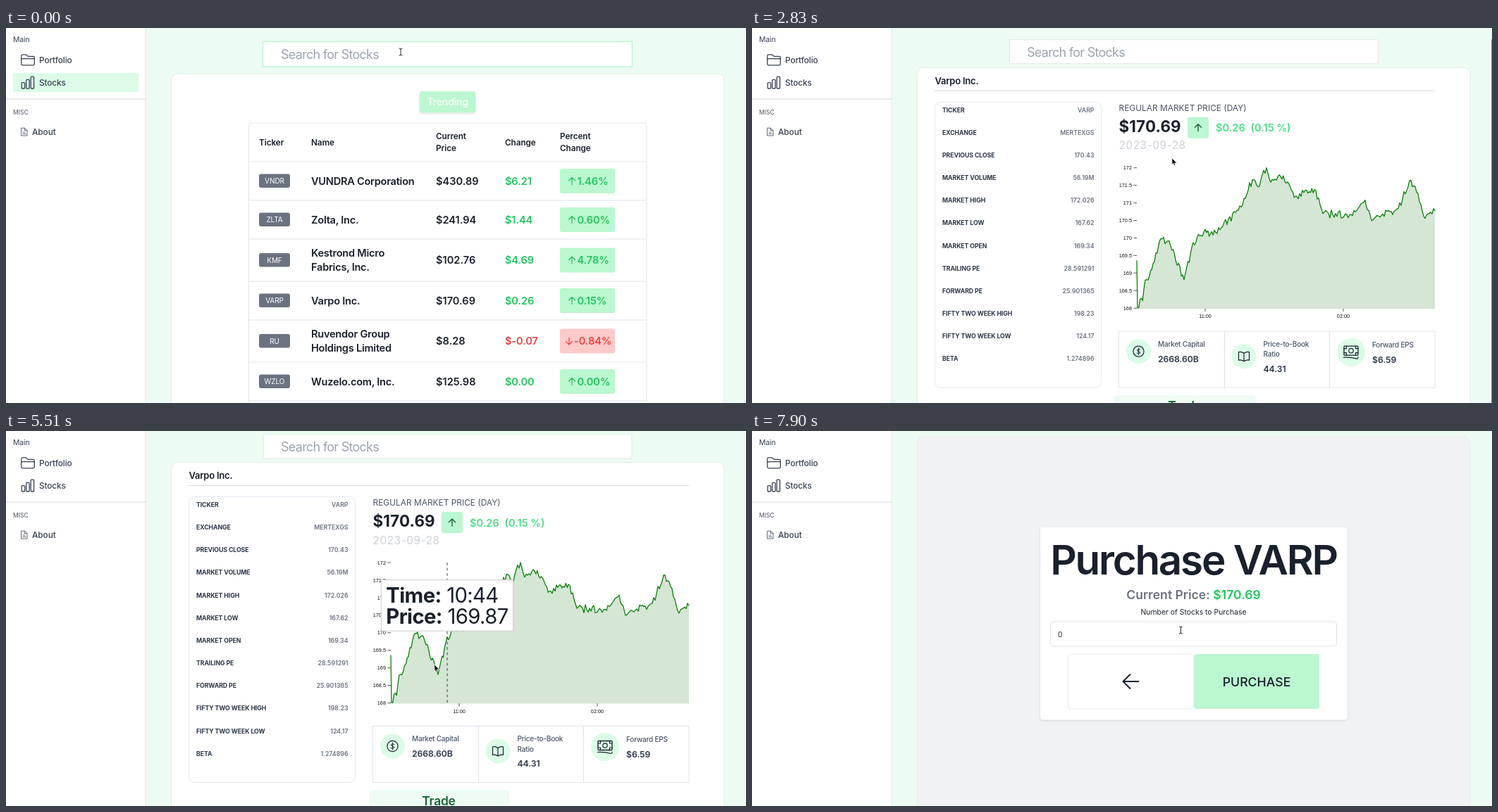
Animation of 1050 by 533 pixels, one loop 8 s. Source, as an HTML page:

```html
<!DOCTYPE html>
<html lang="en">
<head>
<meta charset="utf-8">
<title>Stock dashboard</title>
<style>
  html, body { margin: 0; width: 100%; height: 100%; overflow: hidden; background: #edfcf2; }
  svg { display: block; width: 100%; height: 100%; font-family: Inter, "Open Sans", sans-serif; }
  .axis { font-family: "Liberation Sans", Arial, sans-serif; }
</style>
</head>
<body>
<svg id="stage" viewBox="0 0 1050 533" xmlns="http://www.w3.org/2000/svg"></svg>
<script>
const LOOP = 8000, STEP = 148.8;
const INK = '#1a202c', SLATE = '#2d3748', GRAY = '#6b7280', LINE = '#e2e5ea';
const MINT = '#bbf7d0', PALE = '#dcfce7', GREEN = '#22c55e', PAGE = '#edfcf2';

// Markup helpers: text is placed by the middle of its capitals.
const text = (x, mid, str, size, weight = 400, fill = INK, anchor = 'start', track = -0.008) =>
  `<text x="${x}" y="${mid + size * 0.36}" font-size="${size}" font-weight="${weight}" fill="${fill}" text-anchor="${anchor}" letter-spacing="${track}em">${str}</text>`;
const rect = (x, y, w, h, fill, stroke = 'none', r = 0, extra = '') =>
  `<rect x="${x}" y="${y}" width="${w}" height="${h}" rx="${r}" fill="${fill}" stroke="${stroke}" ${extra}/>`;
const path = (d, stroke, width = 1, fill = 'none') =>
  `<path d="${d}" stroke="${stroke}" stroke-width="${width}" fill="${fill}" stroke-linecap="round" stroke-linejoin="round"/>`;
const rule = (x1, x2, y, color) => `<path d="M${x1} ${y}H${x2}" stroke="${color}"/>`;
const circle = (x, y, r, fill, stroke = 'none') =>
  `<circle cx="${x}" cy="${y}" r="${r}" fill="${fill}" stroke="${stroke}" stroke-width="1.2"/>`;
const group = (id, body, attrs = '') => `<g id="${id}" ${attrs}>${body}</g>`;
const arrow = (x, y, color, dir = 1, width = 1.2) =>
  path(`M${x} ${y + 5 * dir}v${-10 * dir}m-4.5 ${4.5 * dir}l4.5 ${-4.5 * dir}l4.5 ${4.5 * dir}`, color, width);
const searchHint = mid => text(390, mid, 'Search for Stocks', 18, 400, '#9ca3af', 'start', -0.04);

function sidebar() {
  const bar = i => rect(22.2 + i * 6.5, 77.6 - i * 4.2, 4.4, 8.4 + i * 4.2, 'none', '#374151', 1, 'stroke-width="1.3"');
  return rect(-1, -5, 199, 545, '#fff', '#dfe9e4') +
    group('active', rect(10, 64, 178, 27, PALE)) +
    text(10, 16, 'Main', 10.4, 400, '#374151') +
    path('M21.8 45.5v-6q0-1.7 1.7-1.7h4.5l3.5 2.5h7q1.8 0 1.8 1.7v9q0 1.8-1.8 1.8h-15q-1.7 0-1.7-1.8v-5.5q0-1.9 1.7-1.9h15q1.8 0 1.8 1.9', '#374151', 1.3) +
    text(47, 45.5, 'Portfolio', 11.8, 500, '#374151') +
    [0, 1, 2].map(bar).join('') +
    text(47, 77.5, 'Stocks', 11.8, 500, '#374151') +
    rule(0, 198, 101, '#d5d8dd') +
    text(10, 119.5, 'MISC', 8.6, 400, '#4b5563') +
    path('M22 142.2h4.5l3.5 3.5v7.3h-8zm4.5 0v3.5h3.5m-6 2.5h3m-3 2.2h4', '#4b5563', 0.9) +
    text(37, 147.5, 'About', 11.9, 500, '#374151');
}

function stockList() {
  const heads = [[359, 'Ticker'], [433, 'Name'], [610, 'Current Price'], [708, 'Change'], [786, 'Percent Change']];
  const rows = [
    ['VNDR', 'VUNDRA Corporation', '430.89', '6.21', '1.46'],
    ['ZLTA', 'Zolta, Inc.', '241.94', '1.44', '0.60'],
    ['KMF', 'Kestrond Micro|Fabrics, Inc.', '102.76', '4.69', '4.78'],
    ['VARP', 'Varpo Inc.', '170.69', '0.26', '0.15'],
    ['RU', 'Ruvendor Group|Holdings Limited', '8.28', '-0.07', '-0.84'],
    ['WZLO', 'Wuzelo.com, Inc.', '125.98', '0.00', '0.00']
  ];
  const lines = (x, mid, parts, gap, size, track) => parts.map((s, i) =>
    text(x, mid + (i - (parts.length - 1) / 2) * gap, s, size, 600, INK, 'start', track)).join('');
  let top = 190;
  const row = ([ticker, name, price, change, percent]) => {
    const parts = name.split('|'), height = 50 + 5 * parts.length, y = top + height / 2;
    const down = change[0] === '-', color = down ? '#ef4444' : GREEN;
    top += height;
    return rect(359, y - 10, 44, 19.5, GRAY, 'none', 3) +
      text(381, y, ticker, 10, 400, '#fff', 'middle') +
      lines(433, y, parts, 20, 14.6, -0.018) +
      text(610, y, '$' + price, 14.6, 600, INK, 'start', 0) + text(708, y, '$' + change, 14.6, 600, color) +
      rect(786, y - 17.5, 78, 35, down ? '#fecaca' : MINT, 'none', 3) +
      arrow(down ? 799 : 803, y, color, down ? -1 : 1) +
      text(down ? 806 : 810.5, y, percent + '%', 14.6, 600, color) +
      rule(344, 909, top, '#dfe2e7');
  };
  return rect(364.5, 19.5, 524, 35.5, '#fff', MINT, 0, 'stroke-width="1.5"') +
    searchHint(38).replace('<text', '<text id="query"') +
    group('caret', rect(0, 29, 1, 18, INK)) +
    rect(234.5, 65, 784.5, 500, '#fff', '#dcefe4', 9) +
    rect(587, 90, 79, 30.5, MINT, 'none', 4, 'filter="url(#soft)"') +
    text(626.5, 105, 'Trending', 14.6, 600, '#f4fef7', 'middle', -0.035) +
    rect(344.5, 135, 564.5, 450, '#fff', LINE, 4) + rule(344, 909, 190, LINE) +
    heads.map(([x, s]) => lines(x, 162.5, s.split(' '), 17, 11.8, -0.008)).join('') + rows.map(row).join('') +
    group('results', rect(365.5, 56, 523, 121.5, '#fff', LINE) +
      ['Varpo Inc.', 'Varpono Corp.', 'Varpolis Ltd.'].map((s, i) => text(390, 76.5 + i * 40.5, s, 11.8)).join(''));
}

const noise = i => { const v = Math.sin(i * 12.9898) * 43758.5453; return v - Math.floor(v) - 0.5; };
const mix = (a, b, u) => a + (b - a) * u;

// Piecewise linear lookup in rows sorted by their first value.
function sample(rows, at) {
  let i = 1;
  while (i < rows.length - 1 && rows[i][0] < at) i++;
  const a = rows[i - 1], b = rows[i];
  const u = Math.min(1, Math.max(0, (at - a[0]) / (b[0] - a[0])));
  return a.map((v, c) => mix(v, b[c], u));
}

// Price curve: the main swings, roughened by jitter that is strongest at the open.
const SWINGS = [[546, 319], [547, 386], [556, 360], [573, 308], [582, 288], [590, 291], [613, 346], [626, 293.2],
  [641, 279], [658, 279], [690, 247.4], [710, 204], [718, 214], [730, 187], [734, 203], [750, 199], [775, 231],
  [785, 219], [800, 219], [810, 252], [852, 255], [870, 233], [879, 262], [917, 245], [933, 205], [941, 214],
  [955, 259], [969, 248]];
const curve = [SWINGS[0]];
SWINGS.slice(1).forEach(([x, y], i) => {
  const [px, py] = SWINGS[i], count = Math.max(1, Math.round((x - px) / 2));
  for (let j = 1; j <= count; j++) {
    const at = mix(px, x, j / count), rough = 12 + 45 * Math.exp((546 - at) / 11);
    curve.push([at, mix(py, y, j / count) + (j < count ? noise(at) * rough : 0)]);
  }
});

function chart() {
  const line = 'M' + curve.map(([x, y]) => `${x.toFixed(1)} ${Math.min(386, y).toFixed(1)}`).join('L');
  let axis = '';
  for (let i = 0; i <= 8; i++) {
    const y = 187 + i * 24.94;
    axis += rule(541.5, 546, y, '#555') + text(539, y, 172 - i / 2, 7.3, 400, '#111', 'end', 0);
  }
  ['11:00', '02:00'].forEach((s, i) => {
    const x = 643 + i * 196;
    axis += path(`M${x} 387.5v3.5`, '#555') + text(x, 398, s, 7.3, 400, '#111', 'middle', 0);
  });
  return path(line + 'V387.5H546Z', 'none', 0, '#d5e6d4') + path(line, '#0a800a', 1.3) + group('axis', axis, 'class="axis"');
}

function detail() {
  const facts = { 'TICKER': 'VARP', 'EXCHANGE': 'MERTEXGS', 'PREVIOUS CLOSE': '170.43', 'MARKET VOLUME': '56.19M',
    'MARKET HIGH': '172.026', 'MARKET LOW': '167.62', 'MARKET OPEN': '169.34', 'TRAILING PE': '28.591291',
    'FORWARD PE': '25.901365', 'FIFTY TWO WEEK HIGH': '198.23', 'FIFTY TWO WEEK LOW': '124.17', 'BETA': '1.274896' };
  const factRows = Object.entries(facts).map(([name, value], i) => {
    const y = 104.7 + i * 32.18;
    return text(270, y, name, 8.75, 700, SLATE, 'start', -0.01) + text(485.5, y, value, 8.75, 600, GRAY, 'end', 0);
  }).join('');
  const stat = (x, mid, names, value) =>
    names.map((s, i) => text(x, mid + i * 14.5, s, 10.1, 500, '#4a5568', 'start', -0.025)).join('') +
    text(x, mid + 6.5 + names.length * 14.5, value, 12.3, 600, SLATE);
  const stats = rect(520.5, 419.5, 448.5, 80, '#fff', '#dfe4ee') +
    path('M670.5 419.5v80m149-80v80', '#dbe1f1') +
    circle(548.5, 448, 17.5, PALE) + circle(548.5, 448, 7.6, 'none', INK) +
    path('M548.5 443v10m2.5-7.3q-2.5-1.9-4.4-.1q-1 1.8 1.9 2.4q3.1.7 2.1 2.5q-2.1 1.7-4.6-.1', INK) +
    circle(698, 455, 17.5, PALE) +
    path('M698 450.5q-3.5-2.7-7.5-1.5v11.5q4-1 7.5 1.5q3.5-2.5 7.5-1.5v-11.5q-4-1.2-7.5 1.5v11.5', INK, 1.2) +
    circle(850, 449, 20, PALE) + rect(840, 440.5, 20, 13, 'none', INK, 1, 'stroke-width="1.3"') +
    path('M840 444h3.5v-3.5m13 0v3.5h3.5m-20 6h3.5v3.5m13 0v-3.5h3.5m-20.5 6.5q10.500-.5 19 2q1.500.2 1.500-2.500', INK, 1.2) +
    circle(850, 447, 3.2, 'none', INK) +
    stat(576, 437.5, ['Market Capital'], '2668.60B') +
    stat(725.5, 437.5, ['Price-to-Book', 'Ratio'], '44.31') +
    stat(880, 438.5, ['Forward EPS'], '$6.59');
  const loaded = rect(234.5, 44.5, 784.5, 600, '#fff', '#dcefe4', 9) +
    text(259.5, 63.5, 'Varpo Inc.', 13.1, 600, INK, 'start', -0.02) + rule(259, 969, 77.5, '#d3dae2') +
    rect(259.5, 93.5, 236, 406, '#fff', '#e2e8f0', 8) + factRows +
    text(520.5, 102, 'REGULAR MARKET PRICE (DAY)', 11.9, 400, '#4a5568', 'start', 0) +
    text(520.5, 128, '$170.69', 22.4, 700, INK, 'start', 0.006) +
    rect(618, 115, 30, 30, MINT, 'none', 3) + arrow(633, 130, '#166534', 1, 1.4) +
    text(658, 130.5, '$0.26', 14.6, 600, '#4ade80', 'start', 0) + text(707.5, 130.5, '(0.15 %)', 14.6, 600, '#4ade80', 'start', 0) +
    text(520.5, 155, '2023-09-28', 15.4, 400, '#cdd1d8', 'start', 0.035) + chart() + stats +
    `<rect id="trade" y="510.5" height="60" rx="4" fill="#eefcf3"/>` +
    text(614, 525.5, 'Trade', 17.5, 600, '#166534', 'middle', -0.015);
  return rect(365.3, 5, 522.7, 34, '#fff', '#dfeae4') + searchHint(22.5) +
    group('empty', rule(234, 1019, 44.5, '#d3e6de')) + group('loaded', loaded);
}

function tooltip() {
  const row = (y, name, id) => `<text id="${id}Row" x="7" y="${y}"><tspan font-weight="700">${name}:</tspan> <tspan id="${id}"></tspan></text>`;
  return `<path id="guide" d="M0 187V387.5" stroke="#444" stroke-dasharray="4 3.5"/>` +
    group('tip', `<rect id="tipBox" height="72.5" fill="#fff" stroke="#ccc"/>` + row(32.5, 'Time', 'clock') + row(62.5, 'Price', 'price'),
      `font-size="29.3" letter-spacing="-.022em" fill="${INK}"`);
}

function purchase() {
  return rect(234.5, 8, 784.5, 560, '#f1f2f4', '#e4efe9', 9) +
    rect(409, 137, 436, 273.5, '#fff', 'none', 4, 'filter="url(#soft)"') +
    text(626.5, 183, 'Purchase VARP', 58.3, 600, INK, 'middle', -0.038) +
    text(626.5, 232.5, `Current Price: <tspan fill="${GREEN}">$170.69</tspan>`, 17.6, 600, GRAY, 'middle', 0) +
    text(626.5, 257.3, 'Number of Stocks to Purchase', 10.4, 400, INK, 'middle', 0) +
    rect(423.5, 271, 406, 35, '#fff', '#dfe3e8', 4) + text(434, 289, '0', 10.2) +
    rect(448.5, 317, 177.5, 78, '#fff', '#e8eaee', 4) + rect(627, 317, 178, 78, MINT, 'none', 4) +
    path('M548.5 356h-22m10-10l-10 10l10 10', INK, 2) +
    text(716, 356.3, 'PURCHASE', 17.7, 500, INK, 'middle', 0);
}

const cursors =
  group('ibeam', ['#fff', '#111'].map((c, i) => path('M-2-5q2 0 2 1.2q0-1.2 2-1.2m-2 1v8m-2 1q2 0 2-1.2q0 1.2 2 1.2', c, i ? 0.9 : 2)).join('')) +
  group('pointer', path('M0 0v9.3l2.1-1.900l1.400 3.200l1.500-.6l-1.400-3.100h3z', '#fff', 0.7, '#000')) +
  group('hand', path('M-2-5q1-1 2 0v3.500l3.500.7q1.100.4 1 1.800l-.8 4h-5.200l-2.800-4q.1-1.400 2.300-2zm3.300 6.500v2m1.500-2v2', '#111', 0.8, '#fff'));

const stage = document.getElementById('stage');
stage.innerHTML = `<defs><filter id="soft" x="-10%" y="-10%" width="120%" height="130%"><feDropShadow dx="0" dy="1" stdDeviation="1.2" flood-opacity=".16"/></filter></defs>` +
  rect(0, 0, 1050, 533, PAGE) + group('list', stockList()) + group('detail', detail()) +
  group('hover', tooltip()) + group('purchase', purchase()) + group('side', sidebar()) +
  rect(1049, 16, 1, 530, '#8b8f8d', 'none', 0, 'id="scrollbar"') + group('cursor', cursors);

const el = id => document.getElementById(id);
const show = (id, on) => el(id).setAttribute('display', on ? 'inline' : 'none');
const move = (id, x, y) => el(id).setAttribute('transform', `translate(${x} ${y})`);

// Mouse stops: step, x, y.
const MOUSE = [[0, 560, 34], [8, 557, 46], [9, 540, 72.5], [11, 540, 72.5], [18, 596, 185], [24, 596, 185],
  [26, 604, 194], [29, 733, 265], [31, 800, 290], [33, 680, 318], [37, 608, 332], [44, 626.5, 520],
  [46, 626.5, 520], [49, 638, 260.5], [50, 638, 260.5], [53, 608.5, 283]];
const LIST_END = 11, LOADED = 14, BUY = 46;
const QUERY = 'varpo';

function drawTooltip(x) {
  const y = sample(curve, x)[1];
  const minutes = 660 + Math.round((x - 643) / 1.0886);
  const pad = n => String(n).padStart(2, '0');
  el('clock').textContent = pad(Math.floor(minutes / 60) % 12 || 12) + ':' + pad(minutes % 60);
  el('price').textContent = (172 - (y - 187) / 49.875).toFixed(2);
  const width = Math.max(el('clockRow').getComputedTextLength(), el('priceRow').getComputedTextLength()) + 14;
  el('tipBox').setAttribute('width', width);
  move('guide', x, 0);
  move('tip', x - width / 2, y - 81.5);
}

function drawQuery(k) {
  const typed = QUERY.slice(0, k);
  el('query').textContent = typed || 'Search for Stocks';
  el('query').setAttribute('fill', typed ? INK : '#9ca3af');
  show('caret', k > 0);
  move('caret', 391 + el('query').getComputedTextLength(), 0);
  show('results', k > QUERY.length);
}

function render(time) {
  const k = Math.floor((time % LOOP + 8) / STEP);
  const onList = k < LIST_END;
  show('list', onList);
  show('active', onList);
  show('detail', !onList && k < BUY);
  show('purchase', k >= BUY);
  if (onList) drawQuery(k);

  // The page scrolls to its end, then springs back from a small overshoot.
  const spring = k >= 21 && k < 27 ? 2 * 0.75 ** (k - 23) : 0;
  const rest = 17.5 * Math.min(1, Math.max(0, (21 - k) / 3));
  move('detail', 0, rest - spring);
  move('side', 0, -spring);
  show('scrollbar', k >= 19 && k < 27);
  show('empty', k < LOADED);
  show('loaded', k >= LOADED);

  const grow = k >= 44 ? 2 : 0;
  el('trade').setAttribute('x', 515 - grow);
  el('trade').setAttribute('width', 199 + 2 * grow);

  // The tooltip trails the mouse by one step.
  const hovering = k >= 28 && k <= 40;
  show('hover', hovering);
  if (hovering) drawTooltip(sample(MOUSE, k - 1)[1]);

  const [, x, y] = sample(MOUSE, k);
  const kind = k < 9 || k >= 49 ? 'ibeam' : onList || (k >= 44 && k < BUY) ? 'hand' : 'pointer';
  ['ibeam', 'pointer', 'hand'].forEach(id => show(id, id === kind));
  show('cursor', k < 1 || k > QUERY.length);
  move('cursor', x, kind === 'hand' && onList ? y + 5 : y);
}

const start = performance.now();
function tick() {
  render(performance.now() - start);
  requestAnimationFrame(tick);
}
tick();
</script>
</body>
</html>
```
